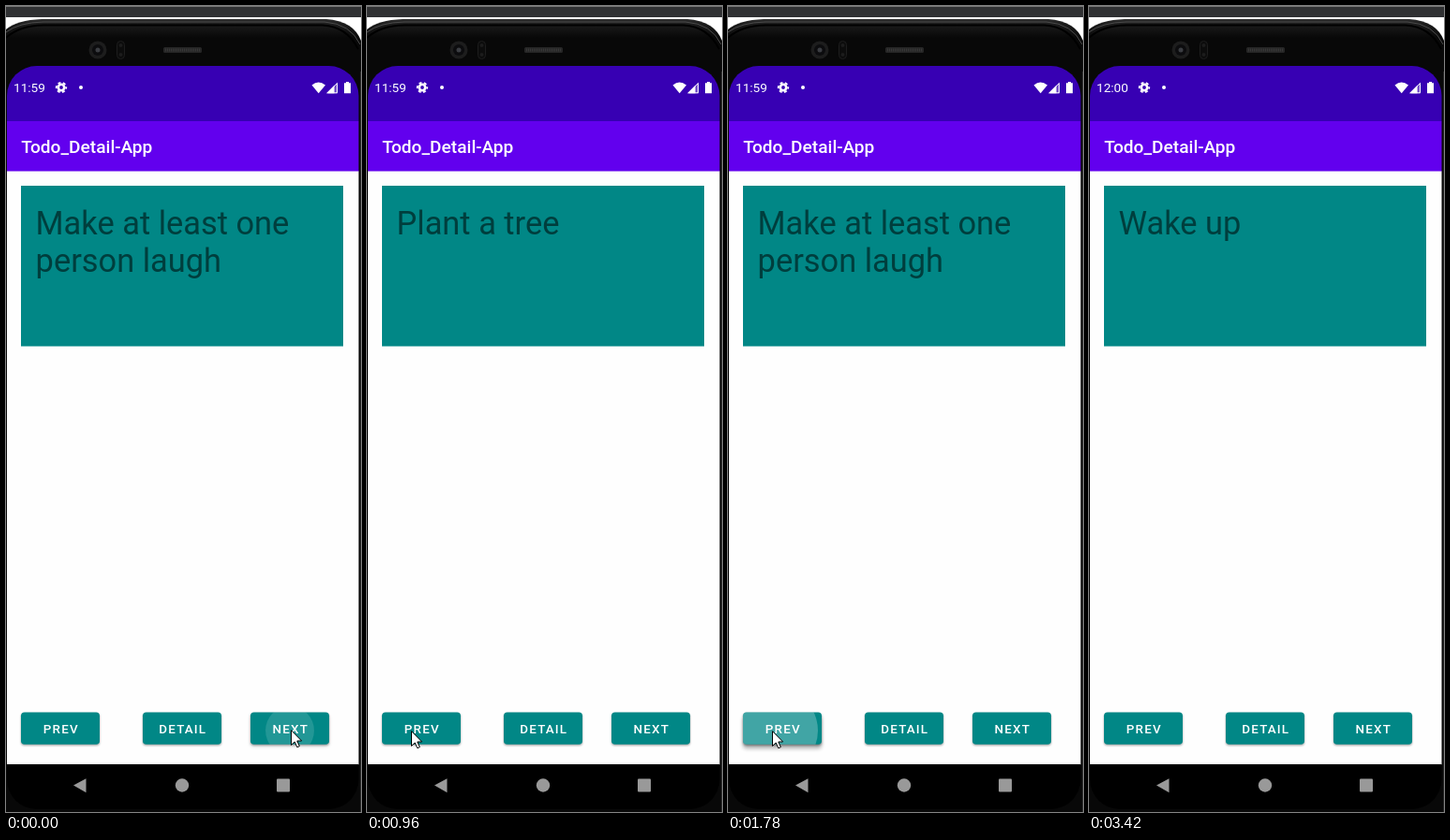
These frames come from a looping animation (379 px wide and 861 px high, 4.24 s). An HTML page:

```html
<!DOCTYPE html>
<html lang="en">
<head>
<meta charset="utf-8">
<title>Todo detail app</title>
<style>
html, body { margin: 0; width: 100%; height: 100%; overflow: hidden; background: #fff; }
svg { display: block; width: 100vw; height: 100vh; }
text { font-family: Roboto, sans-serif; fill: #fff; }
.task { font-size: 34.4px; fill: #000; fill-opacity: .54; }
.label { font-size: 13.4px; font-weight: 500; letter-spacing: 1.19px; text-anchor: middle; }
</style>
</head>
<body>
<svg viewBox="0 0 379 861" xmlns="http://www.w3.org/2000/svg">
  <defs>
    <clipPath id="screen"><rect x="1" y="64" width="375.5" height="794" rx="32"/></clipPath>
    <linearGradient id="rim" x1="0" y1="14" x2="0" y2="34" gradientUnits="userSpaceOnUse">
      <stop offset="0" stop-color="#303030"/>
      <stop offset=".25" stop-color="#1c1c1c"/>
      <stop offset="1" stop-color="#080808"/>
    </linearGradient>
    <filter id="soft" x="-20%" y="-40%" width="140%" height="190%"><feGaussianBlur stdDeviation="1"/></filter>
    <filter id="wide" x="-20%" y="-40%" width="140%" height="190%"><feGaussianBlur stdDeviation="2.2"/></filter>
  </defs>

  <!-- window edge and phone body -->
  <rect width="379" height="861" fill="#fff"/>
  <rect width="379" height="12" fill="#303133"/>
  <rect width="379" height="1" fill="#777"/>
  <path d="M0 25Q12 15 38 14H342Q371 16 379 37V861H0Z" fill="url(#rim)"/>
  <path d="M0 28Q14 17.500 40 17H340Q368 19 378 41" fill="none" stroke="#4b4b4b"/>
  <path d="M0 34Q14 21 40 20.500H338Q364 22 376 46" fill="none" stroke="#000" stroke-width="2"/>
  <path d="M378.500 70V861" stroke="#222"/>
  <circle cx="98" cy="47" r="9.500" fill="#1d1d1d"/>
  <circle cx="98" cy="47" r="6" fill="#0c0c0e"/>
  <circle cx="98" cy="47" r="2.500" fill="#3b3d42"/>
  <rect x="118.500" y="37.500" width="8" height="19" rx="4" fill="#0c0c0c" stroke="#1d1d1d"/>
  <circle cx="122.500" cy="42" r="2" fill="#1c1c1c"/>
  <circle cx="122.500" cy="52" r="2" fill="#1c1c1c"/>
  <rect x="168" y="44" width="41" height="6" rx="1.500" fill="#262626"/>
  <path d="M170 47H208" stroke="#383838" stroke-width="3" stroke-dasharray="1 1"/>

  <g clip-path="url(#screen)">
    <rect y="64" width="379" height="59" fill="#3700b3"/>
    <rect y="123" width="379" height="54" fill="#6200ee"/>
    <rect y="176.500" width="379" height="634" fill="#fefefe"/>
    <rect y="810" width="379" height="51" fill="#000"/>
  </g>

  <!-- status bar -->
  <text id="clock" x="8" y="92" font-size="13.6"></text>
  <g fill="none" stroke="#fff">
    <circle cx="59" cy="87" r="3.200" stroke-width="2.600"/>
    <circle cx="59" cy="87" r="5.200" stroke-width="1.900" stroke-dasharray="2.900 2.545" stroke-dashoffset="1.450"/>
  </g>
  <circle cx="80" cy="87" r="2" fill="#fff"/>
  <path d="M326.500 84.500Q333.500 78.500 341 84.500L333.700 93.300Z" fill="#fff"/>
  <path d="M342 93.300L354 81.300V93.300Z" fill="#fff" fill-opacity=".3"/>
  <path d="M342 93.300L350.500 84.800V93.300Z" fill="#fff"/>
  <path d="M353.500 82.500V92.800H343.500Z" fill="none" stroke="#fff"/>
  <path d="M363 81H366V82.300H368V93.300H361V82.300H363Z" fill="#fff"/>

  <text x="16.300" y="157.300" font-size="19.1" font-weight="500">Todo_Detail-App</text>

  <rect x="16" y="192" width="344" height="171.500" fill="#018786"/>
  <text id="line0" class="task" x="31.600" y="243.700"></text>
  <text id="line1" class="task" x="31.600" y="284"></text>

  <g id="buttons"></g>

  <!-- navigation bar -->
  <path d="M72 832.500L85.500 825.300V840.300Z" fill="#999"/>
  <circle cx="188" cy="832.500" r="7.200" fill="#999"/>
  <rect x="289" y="825.500" width="14" height="14" rx="1" fill="#999"/>

  <path id="cursor" d="M.5.700V16.500L4.200 13L6.800 18.800L9.300 17.700L6.800 12H11.600Z" fill="#fff" stroke="#000"/>
</svg>
<script>
const LOOP = 4240;
const $ = id => document.getElementById(id);

const PLANT = ['Plant a tree'];
const LAUGH = ['Make at least one', 'person laugh'];
const COFFEE = ['Drink Coffee'];
const WAKE = ['Wake up'];

// each list holds [start time, value]; values hold until the next entry
const tasks = [[0, LAUGH], [120, PLANT], [1510, LAUGH], [1930, COFFEE], [2650, WAKE]];
const pointer = [
  [0, [304, 773]], [370, [203, 782]], [500, [126, 780]], [650, [97, 778]],
  [810, [69, 776]], [960, [47, 774]], [3050, null]
];
// press: button, ripple radius, ripple opacity, raised amount
const presses = [
  [0, ['NEXT', 26, .13, .35]], [120, ['NEXT', 90, .25, 1]], [240, ['NEXT', 90, .12, .4]], [370, null],
  [1390, ['PREV', 90, .25, 1]], [1510, ['PREV', 90, .13, .4]], [1660, null],
  [1780, ['PREV', 45, .25, 1]], [1930, ['PREV', 90, .25, 1]], [2080, null],
  [2510, ['PREV', 90, .25, 1]], [2650, ['PREV', 90, .14, .4]], [2770, null]
];
const clock = [[0, '11:59'], [3420, '12:00']];

const at = (track, t) => track.filter(([start]) => start <= t).pop()[1];

function addButton(name, x, rippleX) {
  const box = `x="${x}" y="754.500" width="84" height="34.300" rx="3.800"`;
  $('buttons').innerHTML += `
    <clipPath id="clip${name}"><rect ${box}/></clipPath>
    <rect id="high${name}" ${box} filter="url(#wide)"/>
    <rect id="low${name}" ${box} filter="url(#soft)" transform="translate(0 1.300)" opacity=".36"/>
    <rect ${box} fill="#018786"/>
    <circle id="ripple${name}" cx="${rippleX}" cy="774" fill="#fff" clip-path="url(#clip${name})"/>
    <text class="label" x="${x + 42.8}" y="777">${name}</text>`;
}

addButton('PREV', 16, 51);
addButton('DETAIL', 146, 188);
addButton('NEXT', 261, 303);

function drawButton(name, press) {
  const [, radius, glow, lift] = press && press[0] === name ? press : [name, 0, 0, 0];
  const ripple = $('ripple' + name);
  ripple.setAttribute('r', radius);
  ripple.setAttribute('opacity', glow);
  const high = $('high' + name);
  high.setAttribute('opacity', lift * .3);
  high.setAttribute('transform', `translate(0 ${1.5 + lift * 3})`);
}

function draw(t) {
  const lines = at(tasks, t);
  $('line0').textContent = lines[0];
  $('line1').textContent = lines[1] || '';
  $('clock').textContent = at(clock, t);

  const press = at(presses, t);
  ['PREV', 'DETAIL', 'NEXT'].forEach(name => drawButton(name, press));

  const tip = at(pointer, t);
  $('cursor').setAttribute('visibility', tip ? 'visible' : 'hidden');
  if (tip) $('cursor').setAttribute('transform', `translate(${tip})`);
}

const begin = performance.now();
function tick() {
  draw((performance.now() - begin) % LOOP);
  requestAnimationFrame(tick);
}
tick();
</script>
</body>
</html>
```
